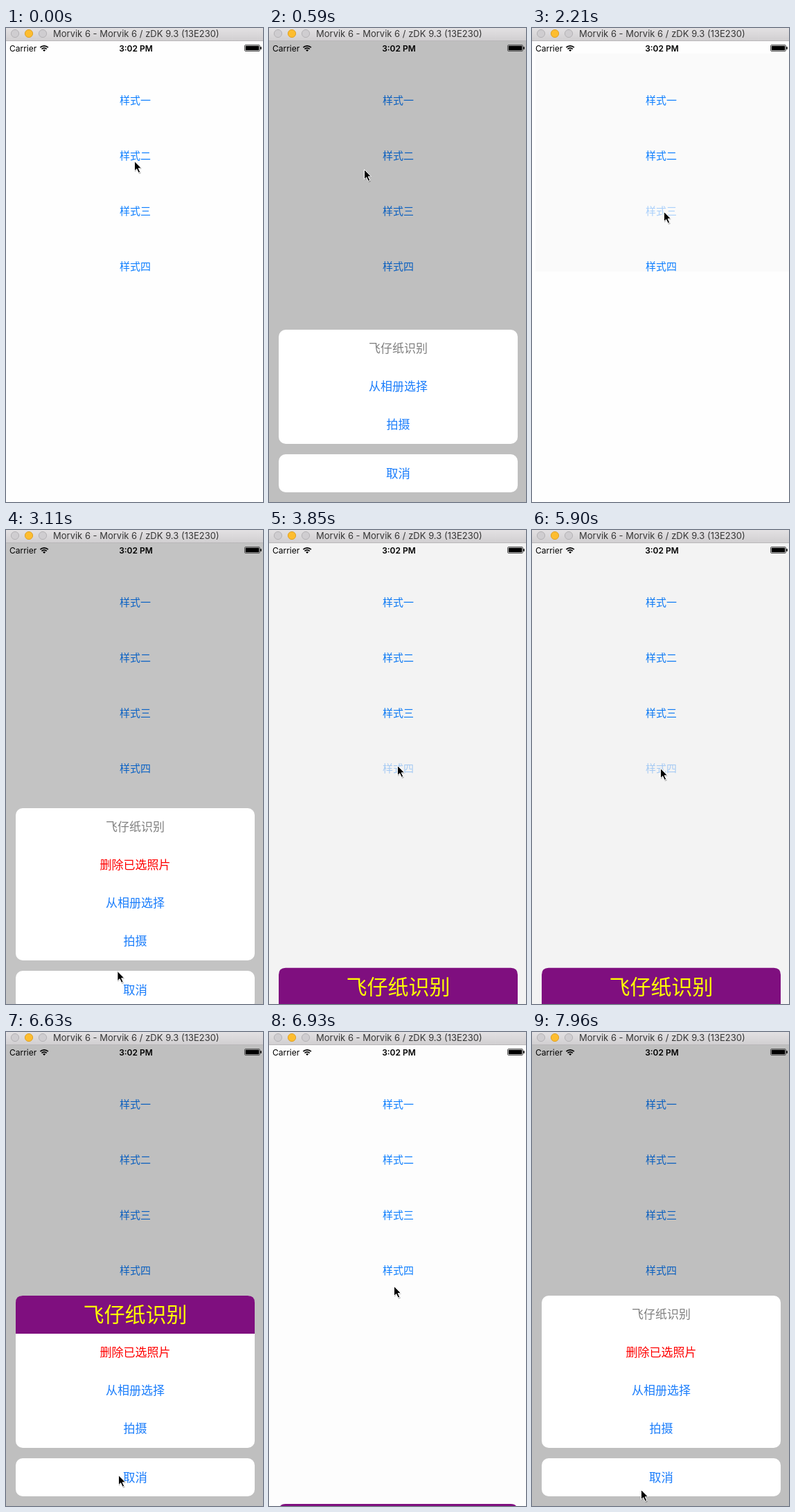
Recreate the animation shown at these times as an HTML page. Size 371 by 685 pixels, loop 8 s.

```html
<!DOCTYPE html>
<html lang="zh">
<head>
<meta charset="utf-8">
<style>
  html, body { margin: 0; width: 100%; height: 100%; overflow: hidden; background: #fefefe; }
  svg { display: block; }
  text { font-family: Inter, "Noto Sans CJK SC", "Noto Sans CJK", sans-serif; }
  .mid { text-anchor: middle; font-family: "Noto Sans CJK SC", "Noto Sans CJK", sans-serif; }
</style>
</head>
<body>
<svg width="371" height="685" viewBox="0 0 371 685">
  <defs>
    <linearGradient id="bar" x2="0" y2="1">
      <stop stop-color="#e3e1e3"/><stop offset="1" stop-color="#d0ced0"/>
    </linearGradient>
  </defs>
  <rect id="shade" x="5" y="37" width="366" height="315" fill="#fafafa"/>
  <g id="buttons" fill="#0c7eff" font-size="15"></g>
  <rect id="dim" y="19" width="371" height="666"/>
  <g font-size="12">
    <text x="5" y="33.5">Carrier</text>
    <text x="187.5" y="33.5" text-anchor="middle" font-weight="600">3:02 PM</text>
  </g>
  <g fill="none" stroke="#000" stroke-width="1.8">
    <path d="M49.4 28.2a8 8 0 0 1 11.4 0M51.5 30.5a5 5 0 0 1 7.2 0"/>
    <path d="M55.1 34l-2-2.1a3 3 0 0 1 4 0z" fill="#000" stroke="none"/>
    <rect x="344.5" y="24.5" width="22" height="9" rx="1.5" stroke-width="1" stroke="#555"/>
    <path d="M346 26h19v6h-19zM367.5 27.5h1v3h-1z" fill="#000" stroke="#000" stroke-width=".6"/>
  </g>
  <g id="sheet"></g>
  <rect width="371" height="19" fill="url(#bar)"/>
  <path d="M0 18.5h371" stroke="#b9b7b9"/>
  <g fill="#cfcdd0" stroke="#b4b2b5">
    <circle cx="13" cy="8" r="5.6"/>
    <circle cx="33" cy="8" r="5.6" fill="#fdbd2f" stroke="#dfa125"/>
    <circle cx="53" cy="8" r="5.6"/>
  </g>
  <text x="68" y="13" font-size="13" fill="#353535">Morvik 6 - Morvik 6 / zDK 9.3 (13E230)</text>
  <g id="cursor">
    <path d="M1 2v14l3-3 3 6 3-1-3-6h4z" opacity=".25"/>
    <path d="M.5.5v14.2l3.2-3 2.6 5.6 2.5-1.1-2.6-5.4h4.4z" stroke="#fff" stroke-width="1"/>
  </g>
</svg>
<script>
const STEP = 147.5, LOOP = 8000, SLIDE = 300, ROW = 55, BOTTOM = 601;
const $ = id => document.getElementById(id);

const BLUE = '#1a7dfb', GRAY = '#7f7f7f';
const TITLE = ['飞仔纸识别', GRAY, 17];
const PICK = [['从相册选择', BLUE, 17], ['拍摄', BLUE, 17]];
const REMOVE = ['删除已选照片', '#f00', 17];
const styles = {
  1: { rows: [TITLE, ...PICK] },
  2: { rows: [TITLE, REMOVE, ...PICK] },
  3: { rows: [['飞仔纸识别', '#ff0', 30], REMOVE, ...PICK], head: '#7f0f7f' },
};

// Each showing: button index, opening time, closing time
const showings = [
  [1, 285, 1240], [2, 2190, 3020], [3, 3730, 5020],
  [3, 5795, 6673], [2, 7370, LOOP + 1],
];

// Pointer path: time, x, y
const pointer = [
  [0, 185, 192], [330, 185, 192], [590, 137, 204], [880, 155, 642],
  [1340, 155, 642], [1760, 190, 265], [2360, 190, 265], [2650, 160, 642],
  [3090, 160, 642], [3540, 185, 340], [4000, 185, 340], [4700, 158, 642],
  [5080, 160, 640], [5600, 185, 344], [6040, 185, 344], [6490, 160, 640],
  [6640, 162, 640], [6932, 180, 367], [7220, 190, 266], [7670, 190, 266],
  [7960, 157, 661], [LOOP, 157, 661],
];

const clamp = x => Math.min(1, Math.max(0, x));
const ease = x => x < .5 ? 4 * x ** 3 : 1 - 4 * (1 - x) ** 3;
const label = (s, y, color, size) =>
  `<text class="mid" x="186.5" y="${y + size * .37}" fill="${color}" font-size="${size}">${s}</text>`;

function sheetMarkup({ rows, head }) {
  const top = BOTTOM - rows.length * ROW;
  const box = (y, h) => `<rect x="14" y="${y}" width="345" height="${h}" rx="10" fill="#fff"/>`;
  return box(top, BOTTOM - top) +
    (head ? `<path d="M14 ${top + ROW}v-45q0-10 10-10h325q10 0 10 10v45z" fill="${head}"/>` : '') +
    rows.map(([s, color, size], i) => label(s, top + ROW * (i + .5) - .5, color, size)).join('') +
    box(616, ROW) + label('取消', 643.5, BLUE, 17.5);
}

$('buttons').innerHTML = [...'一二三四'].map((n, i) =>
  `<text class="mid" x="186.5" y="${109.5 + i * 80}">样式${n}</text>`).join('');
const buttons = [...$('buttons').children];
let shown;

function draw(t) {
  let style = 0, progress = 0, pressed = -1;
  for (const [index, open, close] of showings) {
    if (Math.abs(t - open) < 130) pressed = index;
    if (t >= open && t < close + SLIDE) {
      style = index;
      progress = ease(clamp((t - open) / SLIDE)) - ease(clamp((t - close) / SLIDE));
    }
  }
  buttons.forEach((b, i) => b.setAttribute('opacity', i === pressed ? .33 : 1));
  $('shade').setAttribute('opacity', t > 2200 && t < 2300 ? 1 : 0);
  $('dim').setAttribute('opacity', .25 * progress);
  if (style !== shown) {
    $('sheet').innerHTML = style ? sheetMarkup(styles[style]) : '';
    shown = style;
  }
  if (style) {
    const travel = 685 - BOTTOM + styles[style].rows.length * ROW;
    $('sheet').setAttribute('transform', `translate(0 ${travel * (1 - progress)})`);
  }
  const k = pointer.findIndex(p => p[0] > t);
  const [t0, x0, y0] = pointer[k - 1], [t1, x1, y1] = pointer[k];
  const f = (t - t0) / (t1 - t0);
  $('cursor').setAttribute('transform', `translate(${x0 + (x1 - x0) * f} ${y0 + (y1 - y0) * f})`);
}

function frame() {
  draw(Math.floor((performance.now() % LOOP + 10) / STEP) * STEP);
  requestAnimationFrame(frame);
}
frame();
</script>
</body>
</html>
```
